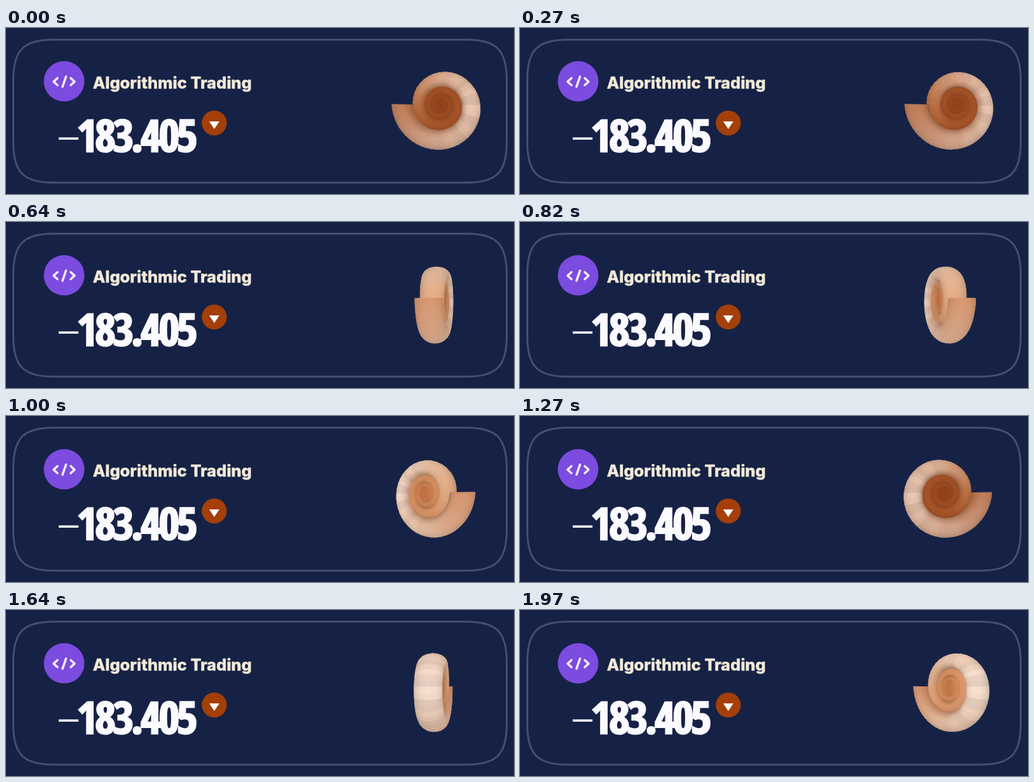
An HTML page with a canvas for the animation above (2 s loop, 800x263 px).

```html
<!DOCTYPE html>
<html lang="en">
<head>
<meta charset="utf-8">
<title>Algorithmic Trading</title>
<style>
html, body { margin: 0; width: 100%; height: 100%; overflow: hidden; background: #162245; }
canvas { display: block; width: 800px; height: 263px; }
</style>
</head>
<body>
<canvas id="stage" width="800" height="263" role="img" aria-label="Algorithmic Trading –183.405"></canvas>
<script>
const ctx = document.getElementById('stage').getContext('2d');
const TAU = Math.PI * 2, LOOP = 2000;
const clamp = (v, a = 0, b = 1) => Math.min(b, Math.max(a, v));
const mix = (a, b, k) => a + (b - a) * k;
const mixColor = (a, b, k) => a.map((v, i) => mix(v, b[i], k));

// ---- card ----
function disc(x, y, r, fill) {
  ctx.fillStyle = fill;
  ctx.beginPath();
  ctx.arc(x, y, r, 0, TAU);
  ctx.fill();
}

function line(points, width, color) {
  ctx.lineWidth = width;
  ctx.strokeStyle = color;
  ctx.beginPath();
  points.forEach(([x, y]) => ctx.lineTo(x, y));
  ctx.stroke();
}

function border(l, t, r, b, c) {
  const k = c * 0.25;
  ctx.beginPath();
  ctx.moveTo(l + c, t);
  ctx.lineTo(r - c, t);
  ctx.bezierCurveTo(r - k, t, r, t + k, r, t + c);
  ctx.lineTo(r, b - c);
  ctx.bezierCurveTo(r, b - k, r - k, b, r - c, b);
  ctx.lineTo(l + c, b);
  ctx.bezierCurveTo(l + k, b, l, b - k, l, b - c);
  ctx.lineTo(l, t + c);
  ctx.bezierCurveTo(l, t + k, l + k, t, l + c, t);
  ctx.strokeStyle = '#435071';
  ctx.lineWidth = 3;
  ctx.stroke();
}

// Picks the font size whose natural width fills the given room.
function fitted(text, style, family, room, tracking, weight) {
  const setFont = size => {
    ctx.font = `${style} ${size}px ${family}`;
    ctx.letterSpacing = `${tracking * size}px`;
  };
  ctx.textAlign = 'left';
  setFont(100);
  const m = ctx.measureText(text);
  const size = 100 * (room - weight) / (m.actualBoundingBoxRight + m.actualBoundingBoxLeft);
  const k = size / 100;
  const left = m.actualBoundingBoxLeft * k + weight / 2, rise = m.actualBoundingBoxAscent * k;
  return {
    rise,
    draw(x, y, color) {
      setFont(size);
      ctx.fillStyle = ctx.strokeStyle = color;
      ctx.lineWidth = weight;
      ctx.lineJoin = 'miter';
      ctx.miterLimit = 3;
      ctx.fillText(text, x + left, y);
      ctx.strokeText(text, x + left, y);
      ctx.letterSpacing = '0px';
    }
  };
}

const NARROW = '"Open Sans Condensed", "Liberation Sans Narrow", "Roboto Condensed", "Liberation Sans", sans-serif';
const title = fitted('Algorithmic Trading', '800', 'Inter, sans-serif', 249, 0, 0.4);
const amount = fitted('183.405', '700', NARROW, 187, -0.06, 2.6);

function drawCard() {
  ctx.fillStyle = '#162245';
  ctx.fillRect(0, 0, 800, 263);
  border(11.5, 18.5, 788.5, 245, 64);

  ctx.lineCap = ctx.lineJoin = 'round';
  disc(91.5, 84.5, 32, '#7c4be0');
  const ink = '#f4edfa';
  line([[81, 79.5], [75, 85], [81, 90.5]], 3.6, ink);
  line([[94.5, 77], [89, 93]], 3.6, ink);
  line([[102, 79.5], [108, 85], [102, 90.5]], 3.6, ink);

  title.draw(137, 96, '#f1e9d8');
  ctx.font = '56px "Liberation Sans", Arial, sans-serif';
  ctx.fillStyle = '#f1f1f8';
  ctx.fillText('–', 83, 189);
  amount.draw(113, 170 + amount.rise / 2, '#fafaff');

  disc(328, 150.5, 19.7, '#a43f08');
  ctx.fillStyle = '#fff';
  ctx.beginPath();
  ctx.moveTo(320, 148);
  ctx.lineTo(336, 148);
  ctx.lineTo(328, 160);
  ctx.closePath();
  ctx.fill();
}

// ---- shell: a tube swept along a logarithmic spiral ----
const AXIS = 675.5, EYE_X = 10.5, EYE_Y = 122.5, SIZE = 79, DEPTH = 700;
const RINGS = 170, SIDES = 24, TURNS = 6;
const DECAY = 0.091, INNER = Math.exp(-TAU * DECAY);
const CREASE = [140, 72, 36];

// [angle, pale tint, deep tint]
const TINTS = [
  [0, [214, 150, 112], [190, 124, 88]],
  [1.3, [232, 189, 160], [206, 160, 134]],
  [3.1, [238, 215, 200], [224, 192, 172]],
  [4.5, [235, 200, 175], [214, 170, 143]],
  [6.2, [226, 172, 134], [186, 112, 68]],
  [7.5, [220, 154, 110], [166, 84, 40]],
  [22, [204, 124, 74], [146, 68, 28]]
];

function tint(phi, deep) {
  let i = 0;
  while (i < TINTS.length - 2 && phi > TINTS[i + 1][0]) i++;
  const [a, p0, d0] = TINTS[i], [b, p1, d1] = TINTS[i + 1];
  const k = clamp((phi - a) / (b - a));
  return mixColor(mixColor(p0, p1, k), mixColor(d0, d1, k), deep);
}

function surface(phi, u) {
  const r = SIZE * Math.exp(-DECAY * phi);
  const half = r * (1 - INNER) / 2 * 1.06, mid = r * (1 + INNER) / 2;
  const thick = 14 + 6.5 * Math.exp(-0.2 * Math.max(0, phi - 4.2));
  const nr = Math.cos(u), nz = Math.sin(u), rad = mid + half * nr;
  return {
    x: EYE_X - rad * Math.cos(phi), y: rad * Math.sin(phi), z: thick * nz,
    nr, nz, nx: -nr * Math.cos(phi), ny: nr * Math.sin(phi)
  };
}

const angleAt = i => -0.02 + TURNS * TAU * Math.pow(i / RINGS, 1.4);
const grid = [], faces = [];
for (let i = 0; i <= RINGS; i++)
  for (let j = 0; j < SIDES; j++) grid.push(surface(angleAt(i), TAU * j / SIDES));
for (let i = 0; i < RINGS; i++)
  for (let j = 0; j < SIDES; j++) {
    const next = (j + 1) % SIDES, phi = (angleAt(i) + angleAt(i + 1)) / 2;
    faces.push({
      ids: [i * SIDES + j, i * SIDES + next, (i + 1) * SIDES + next, (i + 1) * SIDES + j],
      phi, mid: surface(phi, TAU * (j + 0.5) / SIDES)
    });
  }

function facesViewer([a, b, c, d]) {
  return (c[0] - a[0]) * (d[1] - b[1]) > (c[1] - a[1]) * (d[0] - b[0]);
}

function drawShell(angle) {
  const c = Math.cos(angle), s = Math.sin(angle);
  const front = clamp((Math.abs(c) - 0.78) / 0.19);
  const deep = front * front * (3 - 2 * front);
  const spots = grid.map(p => {
    const k = DEPTH / (DEPTH + p.x * s - p.z * c);
    return [AXIS + (p.x * c + p.z * s) * k, EYE_Y + p.y * k];
  });

  const seen = [];
  for (const { ids, phi, mid } of faces) {
    const quad = ids.map(id => spots[id]);
    if (facesViewer(quad)) seen.push({ quad, phi, mid, z: mid.z * c - mid.x * s });
  }
  seen.sort((a, b) => a.z - b.z);

  ctx.lineWidth = 1;
  ctx.lineJoin = 'round';
  for (const { quad, phi, mid } of seen) {
    const facing = clamp(mid.nz * c - mid.nx * s);
    const rib = clamp(1 - Math.abs(phi - 3.1) / 2);
    const light = (0.82 + 0.19 * facing - 0.04 * mid.ny) * (1 + 0.05 * rib * Math.sin(phi * 11));
    const crease = mid.nr < 0 ? 0.55 * mid.nr * mid.nr : 0;
    const rgb = mixColor(tint(phi, deep), CREASE, crease).map(v => Math.round(clamp(v * light, 0, 250)));
    ctx.fillStyle = ctx.strokeStyle = `rgb(${rgb})`;
    ctx.beginPath();
    quad.forEach(p => ctx.lineTo(...p));
    ctx.closePath();
    ctx.fill();
    ctx.stroke();
  }
}

// Slow first stretch, then a steady half turn per second.
function turn(t) {
  const deg = t < 270 ? mix(-12, 13, t / 270) : 13 + 0.18 * (t - 270);
  return deg * Math.PI / 180;
}

function frame() {
  drawCard();
  drawShell(turn(performance.now() % LOOP));
  requestAnimationFrame(frame);
}
frame();
</script>
</body>
</html>
```
